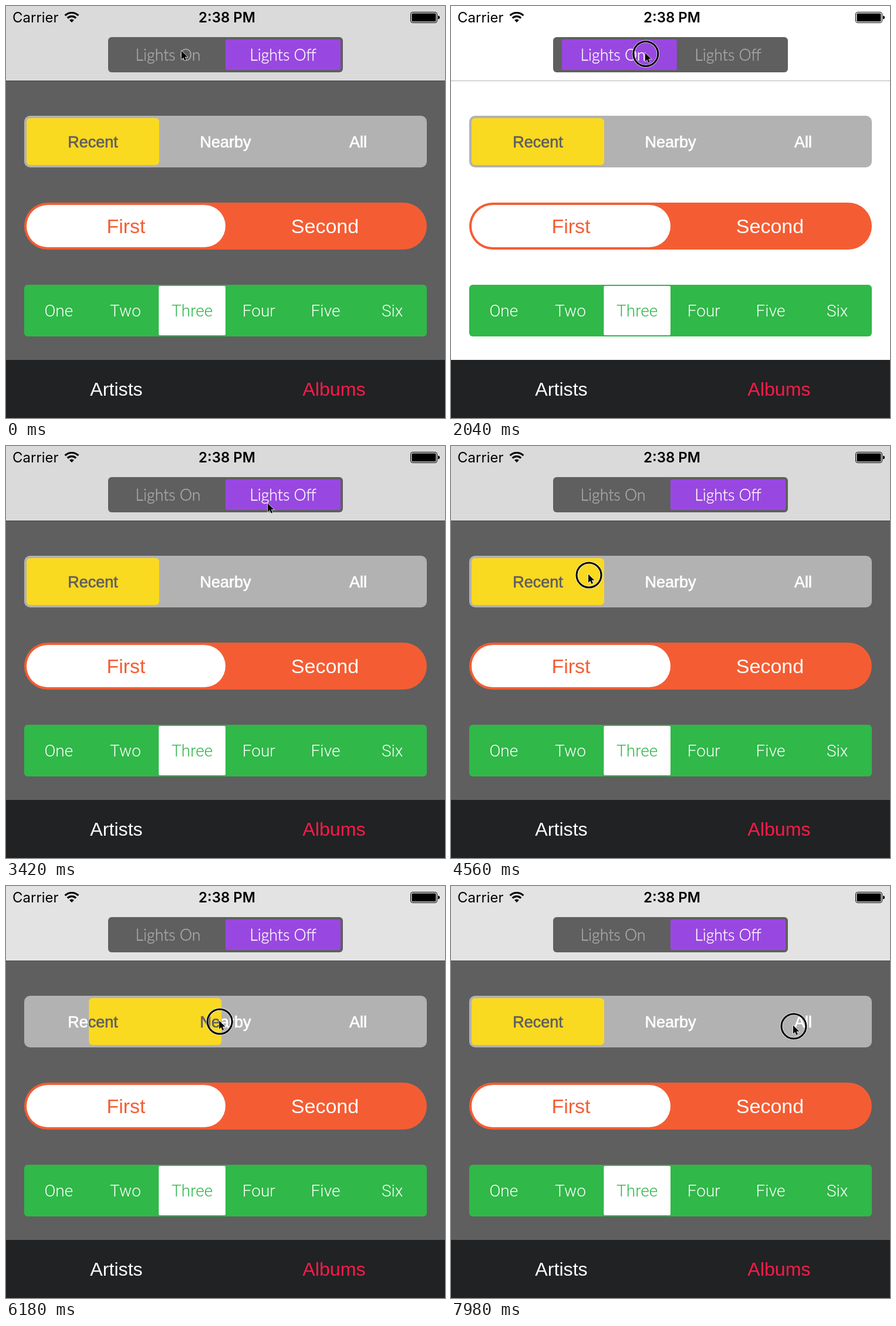
Write an HTML page that moves like this. It is 748 px wide and 702 px high and loops after 8 s.

```html
<!DOCTYPE html>
<html lang="en">
<head>
<meta charset="utf-8">
<title>Segmented controls</title>
<style>
  html, body { margin: 0; width: 748px; height: 702px; overflow: hidden; background: #fff; }
  svg { display: block; }
  text { stroke-width: 0; }
  .status { font: 24px Inter, sans-serif; }
  .lights { font-family: Lato, sans-serif; font-weight: 300; }
  .lights text { stroke-width: .35px; }
  .places, .pill, .tabs { font-family: "Liberation Sans", Arial, sans-serif; }
  .places text { stroke-width: .7px; }
  .numbers { font-family: Roboto, sans-serif; font-weight: 300; }
  .tabs { font-size: 32.2px; }
  .mid { text-anchor: middle; }
</style>
</head>
<body>
<svg width="748" height="702">
  <rect class="dark" y="127" width="748" height="480" fill="#5f5f5f"/>
  <rect class="dark" id="header" width="748" height="127"/>
  <rect y="127" width="748" height="1" fill="#b2b2b2"/>
  <rect class="dark" y="127" width="748" height="1" fill="#484848"/>

  <g class="status">
    <text x="11" y="28">Carrier</text>
    <text class="mid" x="376.5" y="28" font-weight="600">2:38 PM</text>
  </g>
  <g fill="none" stroke="#000" stroke-width="3.2">
    <path d="M100.6 16.2a16.2 16.2 0 0 1 22.8 0M104.8 20.6a10.2 10.2 0 0 1 14.4 0"/>
    <path d="M112 28l-3.9-4a5.6 5.6 0 0 1 7.8 0z" fill="#000" stroke="none"/>
  </g>
  <rect x="689.5" y="10.5" width="45" height="18" rx="3.5" fill="none" stroke="#000"/>
  <rect x="691.5" y="12.5" width="41" height="14" rx="1.5"/>
  <path d="M736 16.5a3 3 0 0 1 0 6z"/>

  <g id="controls"></g>

  <rect y="603" width="748" height="99" fill="#212224"/>
  <g class="tabs mid">
    <text x="188" y="664" fill="#fff">Artists</text>
    <text x="559" y="664" fill="#fb1b48">Albums</text>
  </g>

  <g id="cursor">
    <g id="ring" fill="none">
      <circle r="21" stroke="#fff" stroke-width="4.6" stroke-opacity=".85"/>
      <circle r="21" stroke="#000" stroke-width="3"/>
    </g>
    <path transform="translate(-1 -1.5) scale(.92)" d="M0 0V15.5l3.6-3.4 2.4 5.7 2.6-1.1-2.4-5.5h5z"
          stroke="#fff" stroke-width="1.3" paint-order="stroke"/>
  </g>
</svg>
<script>
const $ = id => document.getElementById(id);

// Each control is centred on the stage; segments follow from its size and inset.
const controls = [
  { name: 'lights', y: 53, width: 400, height: 60, radius: 6, inset: 4, size: 26.7, selected: 1,
    colors: ['#5f5f5f', '#9848e0', '#acacac', '#fff'], labels: ['Lights On', 'Lights Off'] },
  { name: 'places', y: 187, width: 686, height: 88, radius: 10, inset: 4, size: 27, selected: 0,
    colors: ['#b2b2b2', '#fad921', '#fff', '#5f5f5f'], labels: ['Recent', 'Nearby', 'All'] },
  { name: 'pill', y: 335, width: 686, height: 80, radius: 40, inset: 4, size: 34, selected: 0,
    colors: ['#f45d33', '#fff', '#fff', '#f45d33'], labels: ['First', 'Second'] },
  { name: 'numbers', y: 475, width: 686, height: 88, radius: 6, inset: 2, size: 28, selected: 2,
    colors: ['#30b849', '#fff', '#fff', '#30b849'], labels: ['One', 'Two', 'Three', 'Four', 'Five', 'Six'] }
];

const rect = (x, y, w, h, r, attrs) =>
  `<rect x="${x}" y="${y}" width="${w}" height="${h}" rx="${r}" ${attrs}/>`;

function controlMarkup({ name, y, width, height, radius, inset, size, selected, colors, labels }) {
  const [back, front, plain, chosen] = colors;
  const x = 374 - width / 2, left = x + inset;
  const segment = (width - 2 * inset) / labels.length;
  const baseline = y + height / 2 + .365 * size;
  const texts = color => labels.map((label, i) =>
    `<text x="${left + (i + .5) * segment}" y="${baseline}" fill="${color}" stroke="${color}">${label}</text>`).join('');
  const thumb = attrs => rect(left + selected * segment, y + inset, segment, height - 2 * inset, radius - 4,
    `class="${name}Thumb" ${attrs}`);
  return `<g class="${name} mid" font-size="${size}">
    <clipPath id="${name}Clip">${thumb('')}</clipPath>
    ${rect(x, y, width, height, radius, `fill="${back}"`)}${texts(plain)}
    ${thumb(`fill="${front}"`)}
    <g clip-path="url(#${name}Clip)">${texts(chosen)}</g></g>`;
}
$('controls').innerHTML = controls.map(controlMarkup).join('');

const clamp = (v, lo, hi) => Math.max(lo, Math.min(hi, v));
const mix = (a, b, u) => a + (b - a) * u;
const ramp = (t, from, to) => clamp((t - from) / (to - from), 0, 1);
const settle = (t, from) => 1 - (1 - ramp(t, from, from + 300)) ** 3;

const home = [300, 78];
// pointer moves: start, end, x, y
const moves = [
  [1790, 3000, 454, 95],
  [3400, 3660, 365, 154],
  [3820, 4400, 235, 220],
  [4680, 5460, 513, 231],
  [5500, 6300, 338, 231],
  [7220, 7560, 546, 242],
  [7720, 7920, 584, 239]
];
const switchOn = 160, lightsDrop = 3060, placesDrop = 6740;
const presses = [[1380, lightsDrop], [4420, placesDrop], [7820, 8000]];

const pointer = t => moves.reduce(([x, y], [from, to, x1, y1]) => {
  const u = ramp(t, from, to);
  return [mix(x, x1, u), mix(y, y1, u)];
}, home);

const pressed = t => presses.reduce((sum, [down, up]) =>
  sum + ramp(t, down, down + 130) - ramp(t, up, up + 160), 0);

// A drag takes hold only after the pointer has travelled a short way.
const lightsX = (t, x) => t < 1740
  ? mix(374, 178, settle(t, switchOn))
  : mix(clamp(x - 143, 178, 374), 374, settle(t, lightsDrop));
const placesX = (t, x) => t < 4680 ? 35 : mix(clamp(x - 223, 35, 487), 35, settle(t, placesDrop));

const setAll = (selector, attr, value) =>
  document.querySelectorAll(selector).forEach(el => el.setAttribute(attr, value));

function draw(now) {
  const t = Math.floor(now % 8000 / 60) * 60;
  const [x, y] = pointer(t);
  const ring = pressed(t);
  const grey = mix(218, 227, ramp(t, 4680, 5460));

  setAll('.lightsThumb', 'x', lightsX(t, x));
  setAll('.placesThumb', 'x', placesX(t, x));
  setAll('.dark', 'opacity', 1 - settle(t, switchOn) + settle(t, lightsDrop));
  $('header').setAttribute('fill', `rgb(${grey},${grey},${grey})`);
  $('cursor').setAttribute('transform', `translate(${x} ${y})`);
  $('ring').setAttribute('opacity', ring);
  $('ring').setAttribute('transform', `scale(${1.4 - .4 * ring})`);
}

const start = performance.now();
function loop() {
  draw(performance.now() - start);
  requestAnimationFrame(loop);
}
loop();
</script>
</body>
</html>
```
